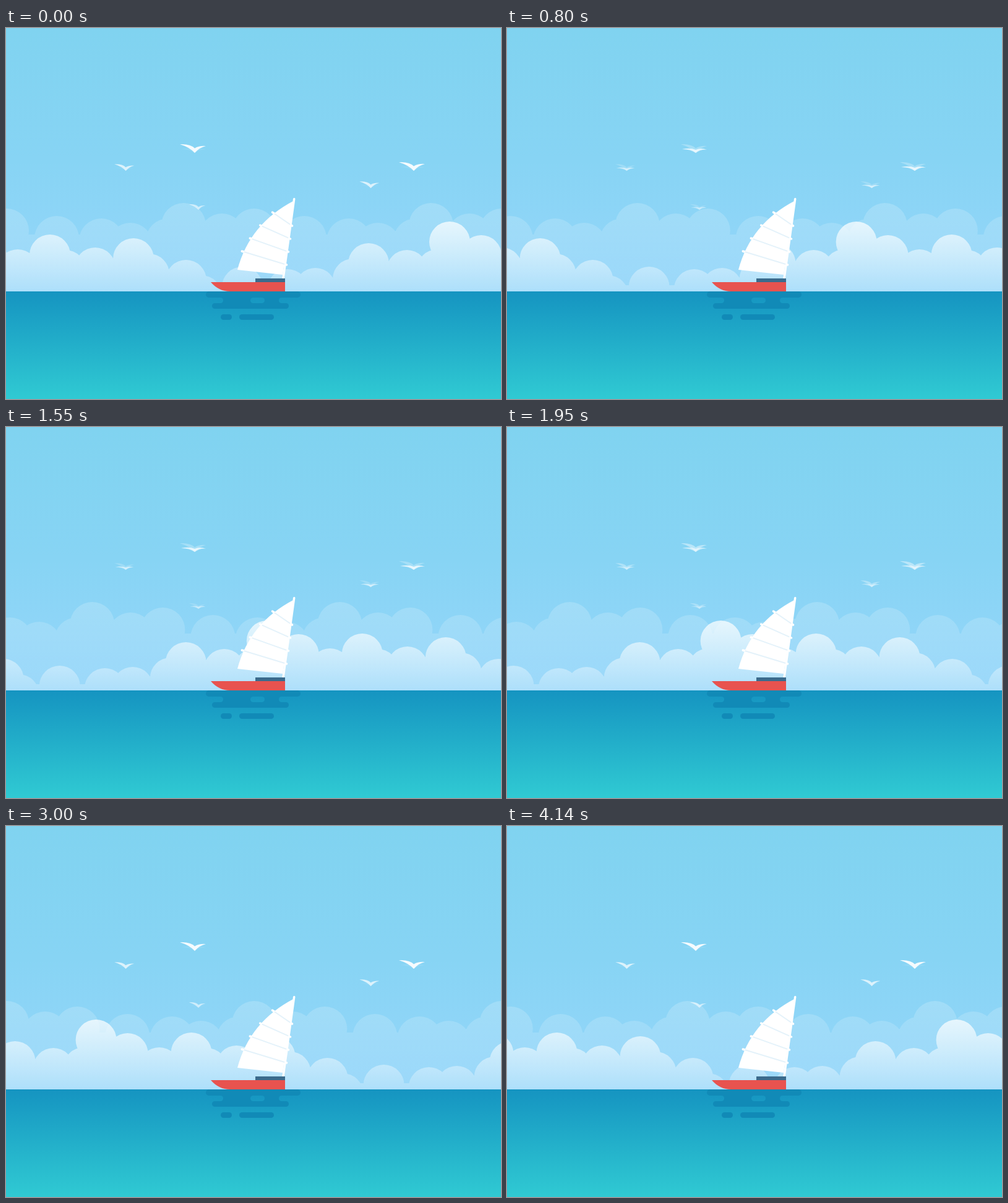
Write an HTML page with a canvas that moves like this. It is 800 px wide and 600 px high and loops after 4190 ms.

```html
<!DOCTYPE html>
<html lang="en">
<head>
<meta charset="utf-8">
<title>Sailing boat</title>
<style>
html, body { margin: 0; height: 100%; overflow: hidden; }
canvas { display: block; }
</style>
</head>
<body>
<canvas id="stage" width="800" height="600"></canvas>
<script>
const c = document.getElementById('stage').getContext('2d');
const LOOP = 4190, STEPS = 84, FLAP = 12, HORIZON = 426;

function gradient(y0, y1, ...colors) {
  const g = c.createLinearGradient(0, y0, 0, y1);
  colors.forEach((color, i) => g.addColorStop(i / (colors.length - 1), color));
  return g;
}

const sky = gradient(0, HORIZON, '#80d3f0', '#87d4f4', '#95d6fa');
const sea = gradient(HORIZON, 600, '#1594c1', '#30cad3');

// Peaks are [x, top], with -1 or 1 for a lower shoulder on the left or right
const far = {
  width: 400, base: 334, radius: 36,
  fill: gradient(283, HORIZON, 'rgba(255,255,255,.19)', 'rgba(255,255,255,.06)'),
  peaks: [[1, 292], [82, 304], [154, 308], [201, 315], [287, 283, -1], [349, 300]]
};
const near = {
  width: 800, base: 416, radius: 33,
  fill: gradient(313, HORIZON, 'rgba(255,255,255,.74)', 'rgba(255,255,255,.18)'),
  peaks: [[19, 358], [71, 334, 1], [144, 355], [206, 340, 1], [291, 375, 1], [382, 386],
    [455, 390], [500, 388], [586, 348, -1], [648, 359], [697, 358], [717, 313], [768, 335]]
};

function cloudPath({ width, base, radius, peaks }) {
  const path = new Path2D();
  const puffs = peaks.flatMap(([x, top, side]) =>
    side ? [[x, top], [x + 25 * side, top + 25]] : [[x, top]]);
  puffs.sort((a, b) => a[0] - b[0]);
  path.rect(-width, base, 800 + 3 * width, HORIZON - base);
  let last;
  for (let tile = -width; tile <= 800 + width; tile += width) {
    for (const [px, top] of puffs) {
      const x = px + tile, y = top + radius;
      path.moveTo(x + radius, y);
      path.arc(x, y, radius, 0, 7);
      if (last) {
        // fill below neighbouring puffs
        const floor = Math.min(HORIZON, Math.max(y, last.y));
        path.rect(last.x, floor, x - last.x, HORIZON - floor);
      }
      last = { x, y };
    }
  }
  return path;
}
far.path = cloudPath(far);
near.path = cloudPath(near);

const wingsUp = new Path2D('M-24-14Q-7-15 0-7.5Q7-12 18-11Q8-9 0 0Q-8-9-24-14Z');
const wingsDown = new Path2D('M-22-6Q-9-9 0-5Q9-9 18-5Q8-6 0 0Q-8-6-22-6Z');
const birds = [[305, 202, 1], [659, 231, 1], [193.5, 231, .76], [589.5, 259, .76], [311, 294, .63]];

const hull = new Path2D('M331 411H451V426H362Q344 426 331 411Z');
const sail = new Path2D('M466 279Q394 316 374 391L447 399Z');

function rect(fill, x, y, w, h) {
  c.fillStyle = fill;
  c.fillRect(x, y, w, h);
}

function line(color, width, x0, y0, x1, y1) {
  c.strokeStyle = color;
  c.lineWidth = width;
  c.beginPath();
  c.moveTo(x0, y0);
  c.lineTo(x1, y1);
  c.stroke();
}

function pill(color, left, right, y, h) {
  line(color, h, left + h / 2, y + h / 2, right - h / 2, y + h / 2);
}

function drawClouds(layer, turn) {
  c.save();
  c.translate(-layer.width * turn, 0);
  c.fillStyle = layer.fill;
  c.fill(layer.path);
  c.restore();
}

function drawBirds(step) {
  const phase = (step + .5) % FLAP / FLAP;
  const down = 1 - Math.abs(1 - 2 * phase);
  c.fillStyle = '#fff';
  for (const [x, y, size] of birds) {
    c.save();
    c.translate(x, y);
    c.scale(size, size);
    // smaller birds are fainter
    c.globalAlpha = size * (1 - down);
    c.fill(wingsUp);
    c.globalAlpha = size * down;
    c.fill(wingsDown);
    c.restore();
  }
}

function drawSea() {
  const shade = '#118ab7';
  rect(sea, 0, HORIZON, 800, 600 - HORIZON);
  pill(shade, 323, 476, 426, 10);
  rect(shade, 346, 435, 100, 11);
  pill(shade, 333, 457, 445, 9);
  pill(sea, 336, 351, 436, 9);
  pill(sea, 395, 418, 436, 9);
  pill(sea, 441, 456, 436, 9);
  pill(shade, 347, 365, 463, 9);
  pill(shade, 377, 433, 463, 9);
}

function drawBoat() {
  line('#fff', 3.5, 465.7, 276.5, 448, 405);
  c.fillStyle = '#fff';
  c.fill(sail);
  for (let i = 0; i < 4; i++) {
    const x0 = 430.5 - 21.5 * i + 1.7 * i * i, y0 = 298 + 21 * i;
    const x1 = 462.5 - 3 * i, y1 = y0 + 22;
    const slope = (y1 - y0) / (x1 - x0);
    line('#fff', 3.5, x0, y0, x1, y1);
    line('#e4f2fa', 2, x0 + 4, y0 + 4 * slope, x1 - 4, y1 - 4 * slope);
  }
  rect('#3b6b8c', 403, 405, 48, 6);
  c.fillStyle = '#e8534f';
  c.fill(hull);
}

function draw(now) {
  const t = now % LOOP;
  // steps of 50 ms, one of them 10 ms shorter
  const step = Math.floor((t < 3240 ? t : t + 10) / 50);
  const turn = step / STEPS;
  c.lineCap = 'round';
  rect(sky, 0, 0, 800, HORIZON);
  drawClouds(far, turn);
  drawClouds(near, turn);
  drawBirds(step);
  drawSea();
  drawBoat();
}

const start = performance.now();
function tick() {
  draw(performance.now() - start);
  requestAnimationFrame(tick);
}
tick();
</script>
</body>
</html>
```
